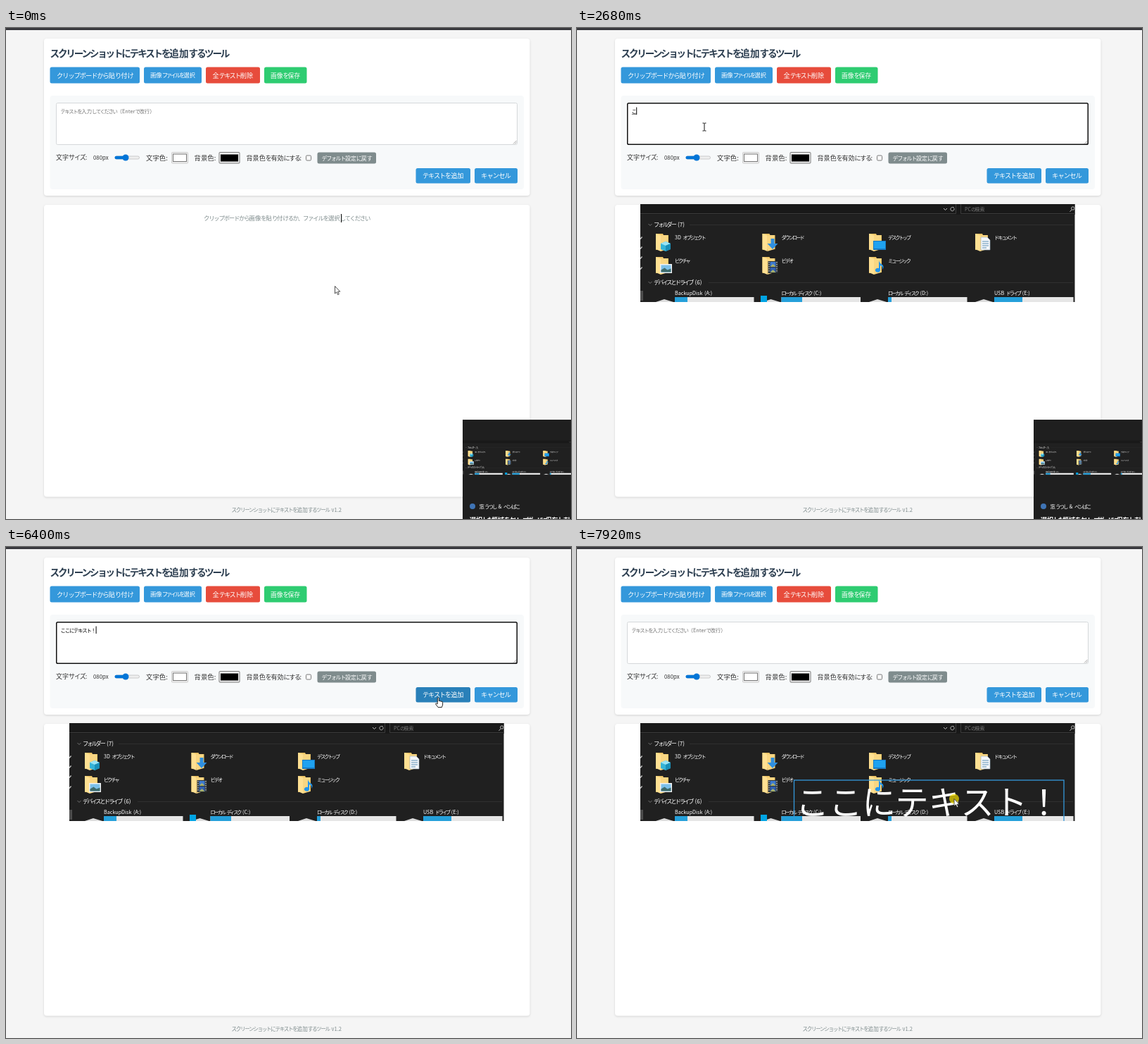
An HTML page that plays this animation: 803x697 px, repeating every 8 s.

```html
<!DOCTYPE html>
<html lang="ja">
<head>
<meta charset="utf-8">
<style>
html, body { margin: 0; width: 100%; height: 100%; overflow: hidden; background: #f5f5f5; }
svg { display: block; }
text { font-family: "Noto Sans CJK JP", "Noto Sans", sans-serif; white-space: pre; word-spacing: .14em; }
.card { fill: #fff; filter: drop-shadow(0 1px 1.5px #0002); }
</style>
</head>
<body>
<svg id="stage" width="803" height="697" viewBox="0 0 803 697"></svg>
<script>
const LOOP = 8000;
const BLUE = '#3498db', GREY = '#7f8c8d', INK = '#333';
const MESSAGE = 'ここにテキスト！';
const ADV = 6.2; // advance of one typed character

const rect = (x, y, w, h, fill, more = '') =>
  `<rect x="${x}" y="${y}" width="${w}" height="${h}" fill="${fill}" ${more}/>`;
const path = (d, fill, more = '') => `<path d="${d}" fill="${fill}" ${more}/>`;
const line = (d, color, width = 1) => path(d, 'none', `stroke="${color}" stroke-width="${width}"`);

// Text centred vertically on cy; kana advance by adv, kanji and Latin keep their natural width.
function text(x, cy, size, adv, fill, str, more = '') {
  const body = str.replace(/&/g, '&amp;')
    .replace(/[\x20-\x7e\u4e00-\u9fff（）]+/g, s => `<tspan letter-spacing="0">${s}</tspan>`);
  return `<text x="${x}" y="${cy + size * .37}" font-size="${size}" letter-spacing="${(adv - size).toFixed(2)}" fill="${fill}" ${more}>${body}</text>`;
}

function button(x, y, w, h, fill, tx, size, adv, label, id = '') {
  return rect(x, y, w, h, fill, `rx="2.5" ${id && `id="${id}"`}`) +
    text(tx, y + h / 2 + .3, size, adv, '#fff', label, 'font-weight="500"');
}

// Folder overlays, relative to the folder's top left corner
const badges = {
  cube: path('M7 15l7-3 7 3v8l-7 3-7-3z', '#35b4d8') + path('M7 15l7-3 7 3-7 3z', '#9be4f4') +
    path('M14 18l7-3v8l-7 3z', '#1a8fb8'),
  down: path('M12 8h5v7h5l-7.5 8-7.5-8h5z', '#2f8fdf'),
  desk: rect(6, 11, 18, 13, '#1779c4') + rect(7, 12, 16, 10, '#1fa2f0'),
  doc: path('M8 6h9l4 4v14h-13z', '#f4f7fa', 'stroke="#9fb4c4" stroke-width=".6"') +
    line('M10 12h9M10 15h9M10 18h9M10 21h6', '#5b8fb4'),
  pic: rect(6, 11, 17, 13, '#f2f2f2') + rect(7.5, 12.5, 14, 10, '#7cc0ea') +
    path('M7.5 22.5v-3l5-3 4 3 5-2v5z', '#3d6b6c'),
  film: rect(8, 7, 14, 17, '#2c3338') + rect(11, 8, 8, 7, '#3f7bd0') + rect(11, 16, 8, 7, '#315fae') +
    path('M11 15l4-4 4 4zM11 23l4-4 4 4z', '#a8b06a') +
    line('M9.5 8v15M20.5 8v15', '#ccc', '1.2" stroke-dasharray="1.5 1.5'),
  note: path('M14 6q1 4 5 6 3 3 0 7 1-5-3-6v7a3.6 3 0 1 1-2-3z', '#2296ee'),
};

const folder = (x, y, badge, label) => `<g transform="translate(${x} ${y})">` +
  path('M0 1h10l1 2h7v20l-18 1z', '#edc465') + path('M0 1l7 2v23l-7-3z', '#ffe092') +
  path('M7 3h10v20l-10 3z', '#f9d682') + badges[badge] + '</g>' +
  text(x + 27, y + 6.5, 7.2, 5.2, '#fff', label);

const drive = (x, label, used) =>
  path(`M${x} 389l12-4 13 4z`, '#dcdcdc') +
  text(x + 27, 376.5, 7.2, 5.1, '#fff', label) +
  rect(x + 27, 382, 112.5, 7, '#e6e6e6') + rect(x + 27, 382, used, 7, '#26a0da');

const heading = (y, label, x) =>
  line(`M101.5 ${y - 1}l2.5 2.5 2.5-2.5`, '#888', .8) +
  text(109, y, 8.2, 6.2, '#fff', label) + line(`M${x} ${y + .5}H705`, '#303030');

const shot = rect(90, 250, 618, 139, '#202020') + rect(90, 250, 618, 15, '#191919') +
  line('M90 263.5H538.5V250M708 263.5H545.5V250', '#3c3c3c') +
  line('M521 256l2.5 2.5 2.5-2.5M535.5 255.5a2.6 2.6 0 1 1-2-1h2', '#bbb') +
  text(551, 257, 7, 5.5, '#777', 'PCの検索') +
  '<circle cx="704.8" cy="256" r="2.2" fill="none" stroke="#bbb"/>' + line('M703 258l-2.5 2.8', '#bbb') +
  rect(90, 373, 4, 14, '#4d4d4d') +
  [298, 312, 326, 341].map(y => line(`M90 ${y + 1.5}l2.5-3`, '#ccc', 1.3)).join('') +
  heading(279, 'フォルダー (7)', 160) + heading(361, 'デバイスとドライブ (6)', 187) +
  folder(112, 291, 'cube', '3D オブジェクト') + folder(263.5, 291, 'down', 'ダウンロード') +
  folder(415, 291, 'desk', 'デスクトップ') + folder(566, 291, 'doc', 'ドキュメント') +
  folder(112, 324, 'pic', 'ピクチャ') + folder(263.5, 324, 'film', 'ビデオ') +
  folder(415, 324, 'note', 'ミュージック') +
  drive(112, 'BackupDisk (A:)', 18) + drive(263.5, 'ローカル ディスク (C:)', 29.5) +
  drive(415, 'ローカル ディスク (D:)', 5) + drive(566, 'USB ドライブ (E:)', 40) +
  rect(261, 380, 9, 9, '#00a4e4');

const header = rect(0, 0, 803, 3, '#38383d') +
  '<rect class="card" x="54" y="15" width="690.5" height="223" rx="4"/>' +
  '<rect class="card" x="54" y="251" width="690.5" height="414.5" rx="4"/>' +
  text(62.5, 36, 13.6, 11.4, '#2c3e50', 'スクリーンショットにテキストを追加するツール', 'font-weight="700"') +
  button(62.5, 55.5, 127.5, 23, BLUE, 72, 9.3, 8.2, 'クリップボードから貼り付け') +
  button(196, 55.5, 82, 23, BLUE, 205, 8.4, 6.1, '画像ファイルを選択') +
  button(284, 55.5, 77, 23, '#e74c3c', 293.5, 9.2, 7.6, '全テキスト削除') +
  button(367, 55.5, 60.5, 23, '#2ecc71', 376, 8.8, 6.8, '画像を保存');

const panel = rect(62.5, 96, 673.5, 133, '#f7f9fa', 'rx="4"') +
  rect(71.5, 106.5, 655, 59, '#fff', 'rx="2" stroke="#d5d8da"') +
  line('M721 164.5l4.5-4.5M723.5 164.5l2-2', '#888', .8) +
  rect(71.75, 106.75, 654.5, 58.5, 'none', 'id="ring" rx="1.8" stroke="#111" stroke-width="1.5"') +
  text(77.5, 118.3, 7.4, 6, '#757575', 'テキストを入力してください（Enterで改行）', 'id="hint"') +
  text(77.5, 118.3, 7.4, ADV, '#000', '', 'id="typed"') +
  line('', '#555', '1" id="under" stroke-dasharray="1.5 .7') +
  line('', '#000', '1" id="caret') +
  text(71, 184, 9, 8, INK, '文字サイズ:') + text(124, 184.3, 7.8, 7.8, INK, '080px') +
  rect(155, 182, 34.5, 4, '#efefef', 'rx="2" stroke="#b8b8b8" stroke-width=".7"') +
  rect(154.5, 181.7, 16, 4.6, '#0075d7', 'rx="2.3"') + '<circle cx="170" cy="184" r="4.5" fill="#0075d7"/>' +
  text(199, 184.5, 9.4, 9.4, INK, '文字色:') + text(267.5, 184.5, 9.4, 9.4, INK, '背景色:') +
  rect(235.5, 176.5, 23, 15.5, '#efefef', 'rx="1" stroke="#ccc"') +
  rect(237.5, 179, 19, 10.5, '#fff', 'stroke="#777"') +
  rect(303, 176.5, 29, 15.5, '#efefef', 'rx="1" stroke="#777"') + rect(305, 179.5, 25, 10, '#000') +
  text(341.5, 184.5, 9.1, 7.6, INK, '背景色を有効にする:') +
  rect(426.5, 181, 7, 7, '#fff', 'rx="1.3" stroke="#767676"') +
  button(442.5, 176.5, 83.5, 16, GREY, 448.5, 8, 6.7, 'デフォルト設定に戻す') +
  button(582.5, 199, 77.5, 21.5, BLUE, 592, 9.2, 8.1, 'テキストを追加', 'add') +
  button(666, 199, 61, 21.5, BLUE, 675, 9.3, 8.4, 'キャンセル');

const toast = '<g id="toast">' + rect(649, 556, 154, 141, '#1f1f1f') +
  '<use href="#shot" transform="translate(617.3 497.3) scale(.352)"/>' +
  '<circle cx="663" cy="679" r="4" fill="#3f74b5"/>' +
  text(672.5, 679, 7.4, 5.6, '#fff', '窓うつし & ペンばこ') +
  text(659, 699, 9, 6.5, '#fff', '選択した領域をクリップボードに保存しました', 'font-weight="700"') + '</g>';

const cursors = '<g id="pointer"><circle id="press" r="7" fill="#ffe800" fill-opacity=".68"/>' +
  `<g id="beam">${line('M-2.5-5.5h2l.5.5.5-.5h2M0-5V5M-2.5 5.5h2L0 5l.5.5h2', '#111')}</g>` +
  `<g id="arrow">${path('M0 0v10.5l2.4-2.2 1.7 3.8 1.7-.8-1.7-3.6h3.2z', '#fff', 'stroke="#222" stroke-width=".8"')}</g>` +
  `<g id="hand">${path('M-1.2 7.5V.5q1-1.5 2 0v4.2q1-.8 1.8.3 1-.7 1.8.4 1.6-.5 1.7 1.2v3.4l-1.3 3.6h-5.2l-3.6-4.8q.3-2 2.8 0z', '#fff', 'stroke="#111" stroke-width=".9"')}</g></g>`;

stage.innerHTML = '<defs><clipPath id="frame"><rect x="90" y="250" width="617.5" height="139"/></clipPath>' +
  `<g id="shot" clip-path="url(#frame)">${shot}</g></defs>` + header + panel +
  text(281, 270, 8.4, 7.2, GREY, 'クリップボードから画像を貼り付けるか、ファイルを選択してください', 'id="empty"') +
  text(320.5, 684, 7.6, 6.25, GREY, 'スクリーンショットにテキストを追加するツール v1.2') +
  '<use id="image" href="#shot"/><g clip-path="url(#frame)"><g id="label">' +
  rect(207.5, 290, 383.5, 59.5, 'none', `stroke="${BLUE}" stroke-width="1.3"`) +
  text(210, 322, 47.2, 47.2, '#fff', MESSAGE, 'font-weight="500"') + '</g></g>' + toast + cursors;

const $ = id => document.getElementById(id);
const show = (id, on) => $(id).style.display = on ? '' : 'none';
const move = (id, x, y) => $(id).setAttribute('transform', `translate(${x} ${y})`);

// Composition states: [start time, text]
const typing = [[0, ''], [2600, 'ｋ'], [2680, 'こ'], [3000, 'こｋ'], [3080, 'ここ'], [3240, 'ここｎ'],
  [3320, 'ここに'], [3400, 'ここにｔ'], [3480, 'ここにて'], [3560, 'ここにてｋ'], [3640, 'ここにてき'],
  [3760, 'ここにてきｓ'], [3840, 'ここにてきす'], [4000, 'ここにてきすｔ'], [4200, 'ここにてきすと'],
  [4320, 'ここにテキスト'], [4800, MESSAGE], [6680, '']];

// Pointer path: [time, x, y]
const route = [[0, 467.5, 366.5], [840, 467.5, 366.5], [1320, 176.5, 162], [1520, 181, 140.5],
  [5600, 181, 140.5], [6360, 614.5, 214], [6640, 614.5, 214], [7400, 435, 316.5],
  [7440, 435, 316.5], [7920, 536, 357.5], [LOOP, 536, 357.5]];

function pointerAt(t) {
  const i = route.findIndex(k => k[0] > t);
  const [a, b] = [route[i - 1], route[i]];
  const u = (t - a[0]) / (b[0] - a[0]), e = u * u * (3 - 2 * u);
  return [a[1] + (b[1] - a[1]) * e, a[2] + (b[2] - a[2]) * e];
}

const within = (t, ...spans) => spans.some(([a, b]) => t >= a && t < b);

function draw(t) {
  const typed = typing.findLast(k => k[0] <= t)[1];
  const end = 78 + typed.length * ADV;
  const pasted = t >= 400;

  show('ring', within(t, [1560, 7500]));
  $('typed').textContent = typed;
  show('hint', !typed);
  show('under', typed && t < 5160);
  $('under').setAttribute('d', `M${t < 4800 ? 78 : end - ADV} 122.5H${end}`);

  show('caret', within(t, [0, 80], [680, 1200], [1560, 2120], [2600, 5700], [6240, 6600], [6700, 7200]));
  $('caret').setAttribute('d', t < 80 ? 'M476.5 264v12' : t < 1200 ? 'M321.5 678v11' : `M${end + .5} 112.5v10.5`);

  show('empty', !pasted);
  show('image', pasted);
  show('toast', t < 5120);
  move('toast', t < 5000 ? 0 : t < 5040 ? 45 : 141, 0);

  const [x, y] = pointerAt(t);
  const overText = x < 727 && y > 106 && y < 166;
  const overAdd = within(x, [582.5, 660]) && within(y, [199, 220.5]);
  show('pointer', !within(t, [80, 840]));
  move('pointer', x, y);
  show('beam', overText);
  show('hand', overAdd);
  show('arrow', !overText && !overAdd);
  show('press', within(t, [1560, 1720], [6600, 6720], [7500, LOOP]));
  $('add').setAttribute('fill', overAdd ? '#2980b9' : BLUE);

  show('label', t >= 6680);
  move('label', t < 7440 ? 0 : x - 435, t < 7440 ? 0 : y - 316.5);
}

const start = performance.now();
function tick() {
  draw((performance.now() - start) % LOOP);
  requestAnimationFrame(tick);
}
tick();
</script>
</body>
</html>
```
